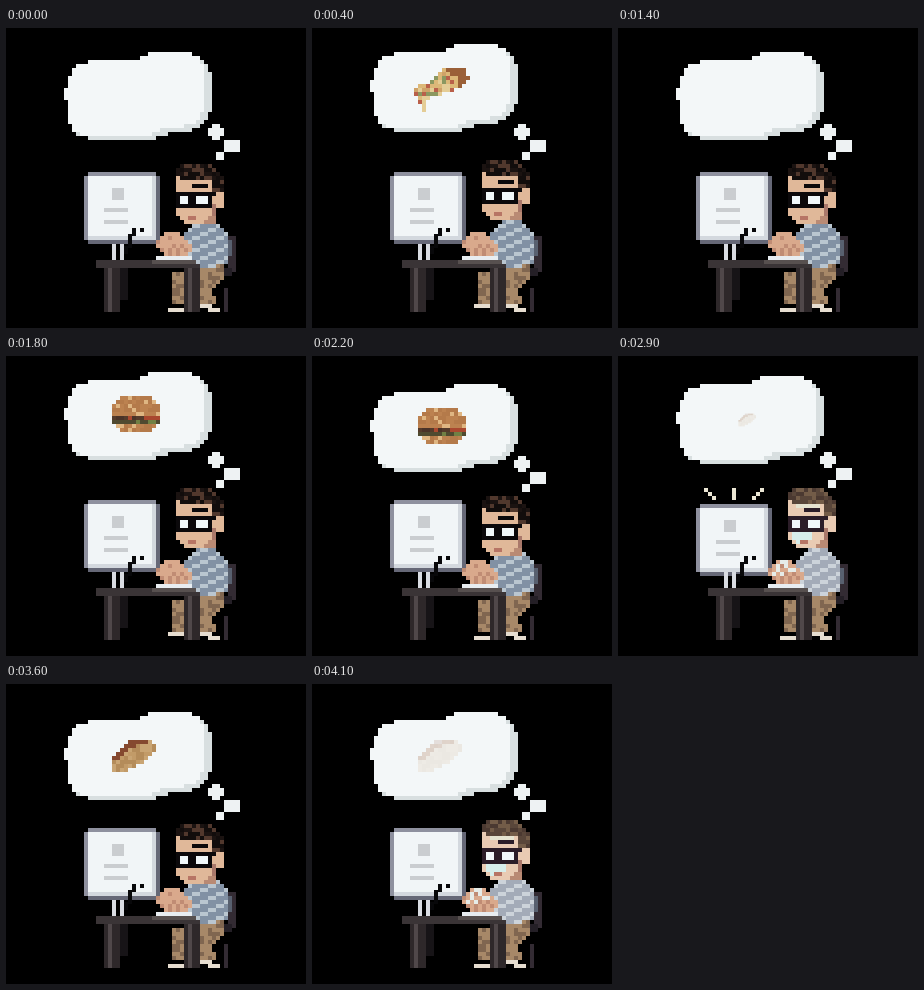
An HTML page with a canvas for the animation above (4.2 s loop, 300 px wide and 300 px high).

```html
<!DOCTYPE html>
<html lang="en">
<head>
<meta charset="utf-8">
<title>Snack daydream</title>
<style>
html, body { margin: 0; width: 100%; height: 100%; overflow: hidden; background: #000; }
canvas { display: block; width: 300px; height: 300px; }
</style>
</head>
<body>
<canvas id="stage" width="300" height="300"></canvas>
<script>
const ctx = document.getElementById('stage').getContext('2d');
const CELL = 4, LEFT = 2, STEP = 100, CYCLE = 14;
let dy = 0;

function box(color, x, y, w = 1, h = 1) {
  ctx.fillStyle = color;
  ctx.fillRect(LEFT + x * CELL, (y + dy) * CELL, w * CELL, h * CELL);
}

function at(offset, paint) {
  dy = offset;
  paint();
  dy = 0;
}

// Shapes are bounds plus an inside test, all in cells
function oval(cx, cy, rx, ry, power = 2) {
  return {
    x0: cx - rx, x1: cx + rx, y0: cy - ry, y1: cy + ry,
    has: (x, y) => Math.abs((x - cx) / rx) ** power + Math.abs((y - cy) / ry) ** power < 1
  };
}

function poly(...pts) {
  const xs = pts.map(p => p[0]), ys = pts.map(p => p[1]);
  return {
    x0: Math.min(...xs), x1: Math.max(...xs), y0: Math.min(...ys), y1: Math.max(...ys),
    has: (x, y) => pts.reduce((inside, [ax, ay], i) => {
      const [bx, by] = pts[(i + 1) % pts.length];
      const hit = (ay > y) !== (by > y) && x < ax + (y - ay) * (bx - ax) / (by - ay);
      return hit ? !inside : inside;
    }, false)
  };
}

function union(...parts) {
  return {
    x0: Math.min(...parts.map(p => p.x0)), x1: Math.max(...parts.map(p => p.x1)),
    y0: Math.min(...parts.map(p => p.y0)), y1: Math.max(...parts.map(p => p.y1)),
    has: (x, y) => parts.some(p => p.has(x, y))
  };
}

// The color may be a rule of the cell
function fill(color, shape) {
  const rule = typeof color === 'function' ? color : () => color;
  for (let y = Math.floor(shape.y0); y < shape.y1; y++)
    for (let x = Math.floor(shape.x0); x < shape.x1; x++)
      if (shape.has(x + .5, y + .5)) box(rule(x, y), x, y);
}

function noise(x, y) {
  const v = Math.sin(x * 12.9898 + y * 78.233) * 43758.5453;
  return v - Math.floor(v);
}

const speckle = (...colors) => (x, y) => colors[Math.floor(noise(x, y) * colors.length)];

const cloud = union(oval(28.5, 19, 13.5, 10, 4), oval(40.5, 17, 10.5, 10, 3), oval(16, 17.5, 2, 2.5));
const puffs = [oval(52, 26, 2.1, 2.1), oval(56, 29.5, 2, 1.6), oval(53, 32, 1.1, 1.1, 4)];

function puffy(shape) {
  fill((x, y) => shape.has(x + 2, y + 1.5) ? '#f3f7f8' : '#d8dfe0', shape);
}

const foods = [
  function pizza() {
    fill(speckle('#dcb878', '#cfa268', '#dcb878', '#b9604a', '#8b9860', '#e4cd96'),
      poly([25, 18], [28, 17], [33, 13], [39, 15], [37, 18], [30, 20], [26, 22]));
    fill('#9a6038', poly([33, 13], [38, 13], [39, 16], [36, 19], [36, 15], [33, 14]));
    box('#e4cd96', 27, 20, 1, 4);
  },
  function burger() {
    const layers = { 18: speckle('#4a3328', '#a9482f', '#553b2b'), 19: speckle('#708044', '#4f4a30') };
    const bun = speckle('#bc8250', '#b47a4a', '#bc8250', '#b47a4a', '#dfb682');
    fill((x, y) => (layers[y] || bun)(x, y), oval(32, 17.5, 6.1, 4.8, 2.6));
  },
  function hotDog() {
    fill(speckle('#c29b68', '#c9a574', '#b48c5a'),
      poly([26, 18], [30, 15], [35, 14], [37, 15], [37, 17], [33, 20], [29, 22], [26, 22]));
    fill('#85492f', poly([26, 18], [31, 14], [36, 14], [29, 17], [27, 20]));
  }
];

function food(kind, step, rise) {
  const fade = n => Math.min(1, .14 * n * n);
  const size = Math.min(1, .2 + .2 * step);
  ctx.save();
  ctx.globalAlpha = fade(step) * fade(CYCLE - step);
  ctx.translate(130, (18 - rise) * CELL);
  ctx.scale(size, size);
  ctx.translate(-130, -18 * CELL);
  foods[kind]();
  ctx.restore();
}

function monitor() {
  box('#666877', 20, 37, 18, 17);
  box('#8e909e', 20, 36, 17);
  box('#8e909e', 19, 37, 1, 16);
  box('#d3d8de', 20, 37, 17, 16);
  box('#f1f5f7', 20, 37, 16, 15);
  box('#cacdd0', 26, 40, 3, 3);
  for (const y of [45, 48]) box('#cacdd0', 24, y, 6);
}

function flare() {
  for (let k = 0; k < 3; k++)
    for (const x of [21 + k, 28, 35 - k]) box('#ebe6d4', x, 33 + k);
}

function chair() {
  box('#332b33', 55, 52, 2, 9);
  box('#241f26', 52, 60, 4, 2);
  box('#332b33', 54, 65, 1, 6);
}

function legs(lift) {
  const cloth = speckle('#a78868', '#a78868', '#806650');
  fill(cloth, poly([47, 59], [54, 59], [54, 63], [51, 65], [52, 69], [48, 69], [48, 62]));
  fill(cloth, poly([41, 61], [44, 61], [44, 69], [41, 69]));
  box('#e6ddd0', 48, 69, 3);
  box('#e6ddd0', 50, 70, 3);
  box('#e6ddd0', 40, 70 - lift, 4);
}

function desk() {
  for (const x of [26, 28]) box('#d9dce2', x, 54, 1, 4);
  box('#3a3436', 22, 58, 27, 2);
  box('#57504f', 36, 58, 13);
  for (const x of [24, 44]) {
    box('#2e282a', x, 60, 4, 11);
    box('#50484a', x + 1, 60, 1, 11);
  }
  box('#171417', 28, 60, 2, 8);
  for (let k = 0; k < 4; k++) box('#08080a', 31 - Math.ceil(k / 2), 50 + k * 1.5, 1, 2);
  box('#08080a', 33, 50);
}

function torso(lit) {
  const [base, stripe] = lit ? ['#a3abb8', '#ccd3da'] : ['#8291a4', '#bac6d0'];
  fill((x, y) => x > 54 ? '#58606f' : (x + 2 * y) % 6 < 2 ? stripe : base,
    poly([47, 48], [52, 48], [55, 51], [56, 55], [55, 59], [49, 60], [46, 57], [43, 56], [43, 53], [46, 50]));
}

function hands(lit) {
  box('#e8edf1', 37, 57, 9);
  fill(speckle('#d9a98c', '#d9a98c', '#c08c74', lit ? '#e6ece8' : '#d9a98c'),
    poly([40, 51], [43, 51], [46, 55], [45, 57], [39, 57], [37, 54]));
}

function head(lit) {
  const skin = lit ? '#e9cbb3' : '#e0b899';
  const hair = lit ? speckle('#59463a', '#4b3931', '#735c48') : speckle('#120d0c', '#1b1311', '#51382d');
  const frame = lit ? '#2b1d28' : '#0b090b';
  box('#b98a74', 47, 47, 5, 2);
  fill(skin, poly([42, 37], [52, 37], [52, 45], [50, 48], [48, 49], [45, 49], [42, 46]));
  box(skin, 52, 41, 2, 4);
  box('#a9786a', 51, 44, 1, 3);
  fill(hair, poly([44, 34], [50, 34], [54, 37], [54, 41], [51, 42], [51, 38], [43, 38], [42, 36]));
  box(frame, 46, 39, 4);
  if (lit) {
    fill('#d7eeeb', oval(45.5, 46, 3, 2));
    box('#e5e3d0', 44, 38, 6);
  }
  box(frame, 42, 41, 10);
  box(frame, 42, 42, 9, 3);
  box('#f1f8fa', 43, 42, 2, 2);
  box('#f1f8fa', 47, 42, 3, 2);
  box('#b77565', 45, 47, 2);
}

function draw(tick) {
  const step = tick % CYCLE;
  const rise = step < 7 ? Math.min(3, step + 1, 7 - step) : 0;
  const headRise = step === CYCLE - 1 ? 1 : Math.min(2, rise);
  const lit = step % 2 === 1;
  const flash = step >= 1 && step <= 3;
  ctx.fillStyle = '#000';
  ctx.fillRect(0, 0, 300, 300);
  at(-rise, () => puffy(cloud));
  food(Math.floor(tick / CYCLE), step, rise);
  at(rise ? 0 : 1, () => puffs.forEach(puff => fill('#eef2f3', puff)));
  chair();
  legs(step >= 3 && step <= 6 ? 1 : 0);
  at(flash ? 1 : 0, monitor);
  if (flash) flare();
  desk();
  torso(lit);
  at(1 - headRise, () => head(lit));
  hands(lit);
}

const start = performance.now();
let shown = -1;
function frame() {
  const elapsed = Math.max(0, performance.now() - start);
  const tick = Math.floor(elapsed / STEP) % (CYCLE * foods.length);
  if (tick !== shown) draw(shown = tick);
  requestAnimationFrame(frame);
}
frame();
</script>
</body>
</html>
```
